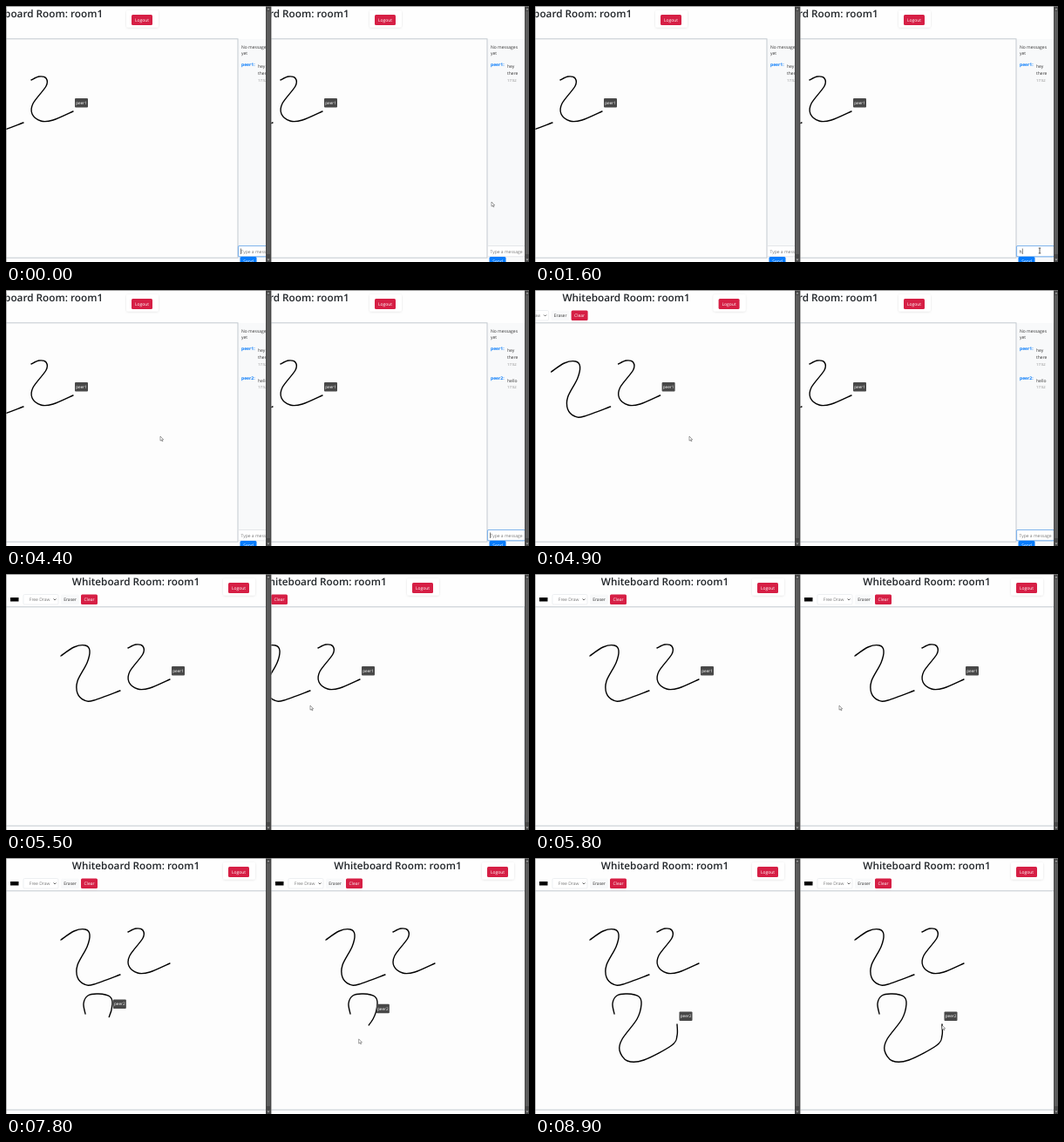
Write an HTML page that moves like this. It is 600 px wide and 294 px high and loops after 9 s.

```html
<!DOCTYPE html>
<html lang="en">
<head>
<meta charset="utf-8">
<title>Whiteboard</title>
<style>
  html, body { margin: 0; width: 100%; height: 100%; overflow: hidden; background: #fefefe; }
  svg { display: block; width: 600px; height: 294px; }
  text { font: 5px "Open Sans", "Noto Sans", sans-serif; fill: #333; text-rendering: geometricPrecision; }
  .title { font-size: 11.75px; font-weight: 600; fill: #212529; text-anchor: middle; }
  .mid { text-anchor: middle; }
  .light { fill: #fff; }
  .soft { fill: #777; }
  .name { font-weight: 700; fill: #087bfa; }
  .time { font-size: 4.2px; fill: #888; }
  .tag { font-size: 4.7px; fill: #fff; text-anchor: middle; }
  .ink { fill: none; stroke: #000; stroke-width: 1.4; stroke-linecap: round; stroke-linejoin: round; }
</style>
</head>
<body>
<svg id="stage" viewBox="0 0 600 294"></svg>
<script>
const LOOP = 9000, STEP = 100, RED = '#d61f45', BLUE = '#087bfa';
const stage = document.getElementById('stage');

// Catmull-Rom curve through a few points.
function curve(points) {
  const p = points.split(' ').map(s => s.split(',').map(Number));
  const at = i => p[Math.max(0, Math.min(p.length - 1, i))];
  const handle = (i, side) => at(i).map((v, k) => v + side * (at(i + 1)[k] - at(i - 1)[k]) / 6);
  return `M${p[0]}` + p.slice(1).map((q, i) => `C${handle(i, 1)} ${handle(i + 1, -1)} ${q}`).join('');
}

const strokes = [
  '63,94 78,84 91,82 96,88 93,102 82,123 82,137 90,145 101,145 131,134',
  '140,85 149,81 157,83 157,92 142,112 141,124 151,132 165,131 188,121',
  '91,179 89,167 94,158 106,156 119,159 122,168 117,185 100,208 97,221 106,233 125,232 157,215 163,204 163,191'
].map(curve);

const rect = (x, y, w, h, fill, more = '') =>
  `<rect x="${x}" y="${y}" width="${w}" height="${h}" fill="${fill}" ${more}/>`;
const text = (x, y, str, cls = '', id = '') => `<text x="${x}" y="${y}" class="${cls}" id="${id}">${str}</text>`;
const button = (x, y, w, h, label, fill, cls = 'light') =>
  rect(x, y, w, h, fill, 'rx="1.5"') + text(x + w / 2, y + h / 2 + 1.8, label, 'mid ' + cls);
const tag = (id, name) => `<g id="${id}">${rect(0, 0, 15, 10.5, '#484848', 'rx="1"')}${text(7.5, 6.8, name, 'tag')}</g>`;
const message = (y, name, lines) =>
  text(381, y, name + ':', 'name') +
  lines.map((line, i) => text(400, y + 2.5 + 7.8 * i, line)).join('') +
  text(400, y + 2.2 + 8.2 * lines.length, '17:52', 'time');

function pane(id, x, width) {
  return `<clipPath id="${id}clip">${rect(0, 0, width, 294, '#000')}</clipPath>
  <g transform="translate(${x})"><g clip-path="url(#${id}clip)">
    ${rect(0, 0, width, 294, '#fefefe')}
    <g id="${id}page">
      ${text(width / 2, 13, 'Whiteboard Room: room1', 'title')}
      ${rect(width - 49, 5, 37, 19.5, '#fff', 'rx="2" filter="url(#shade)"')}
      ${button(width - 43, 10, 24, 12, 'Logout', RED)}
      ${rect(5, 27, 9.5, 4.5, '#000')}
      ${rect(20, 23.5, 40, 11.5, '#fff', 'rx="1.5" stroke="#e3e6e9" stroke-width=".6"')}
      ${text(26.8, 31.1, 'Free Draw', 'soft')}
      <path d="M54.5 28.5l1.5 1.5 1.5-1.5" fill="none" stroke="#444" stroke-width=".8"/>
      ${button(63, 23.5, 21, 11.5, 'Eraser', '#f8f9fa', '')}
      ${button(86, 23.5, 19, 11.5, 'Clear', RED)}
      ${rect(377, 38, 44, 256, '#f8f9fa')}
      ${rect(-2, 37.8, 379, 251.4, '#fdfdfd', 'stroke="#c3c9cf"')}
      ${text(381, 48.5, 'No messages')}${text(381, 56.2, 'yet')}
      ${message(68.5, 'peer1', ['hey', 'there'])}
      <g id="${id}reply">${message(103, 'peer2', ['hello'])}</g>
      ${rect(377.5, 275.5, 43, 12.3, '#fff', `id="${id}field" rx="1"`)}
      ${text(380.5, 283.6, '', '', id + 'entry')}
      ${rect(380, 278.5, .6, 6.5, '#222', `id="${id}caret"`)}
      ${button(379.5, 288, 19, 10, 'Send', BLUE)}
      ${strokes.map((d, i) => `<path class="ink" id="${id}ink${i}" d="${d}"/>`).join('')}
      ${tag(id + 'tag1', 'peer1')}${tag(id + 'tag2', 'peer2')}
    </g></g>
    ${rect(0, 0, .6, 294, '#888')}
    ${rect(width, 0, 6, 294, '#474747')}
    ${rect(width + 1, 6, 4, 279, '#5c5c5c')}
    <path d="M${width + 1.5} 4.5l1.5-2 1.5 2zM${width + 1.5} 290.5l1.5 2 1.5-2z" fill="#aaa"/>
  </g>`;
}

stage.innerHTML = `<filter id="shade" x="-20%" y="-20%" width="140%" height="150%">
    <feDropShadow dx="0" dy=".6" stdDeviation=".8" flood-opacity=".13"/></filter>
  ${pane('L', 0, 298)}${pane('R', 304, 291)}
  ${rect(0, 0, 600, .7, '#777')}
  <path id="arrow" d="M0 0v5.2l1.3-1.1.8 1.8.8-.3-.8-1.8h1.6z" fill="#fff" stroke="#444" stroke-width=".5"/>
  <path id="beam" d="M-1.3-3h2.6M0-3v6M-1.3 3h2.6" fill="none" stroke="#222" stroke-width=".7"/>`;

const $ = id => document.getElementById(id);
const show = (id, on) => $(id).setAttribute('visibility', on ? 'visible' : 'hidden');
const move = (id, x, y) => $(id).setAttribute('transform', `translate(${x} ${y})`);
const ramp = (t, from, to) => Math.max(0, Math.min(1, (t - from) / (to - from)));

// The second user's stroke: a careful start, then a quick finish.
const guide = $('Link2'), total = guide.getTotalLength();
const drawn = t => total * (.48 * ramp(t, 6500, 7800) + .52 * ramp(t, 7800, 8420));
const tip = t => guide.getPointAtLength(drawn(t));

// Each move: start, end, x, y.
const moves = [[300, 1000, 579, 281], [3400, 4400, 177, 168], [5200, 5500, 349, 151], [6100, 6500, 395, 180]];

function pointer(t) {
  if (t > 6500) {
    const p = tip(t);
    return [p.x + 304, p.y + 1];
  }
  return moves.reduce(([x, y], [from, to, toX, toY]) => {
    const f = ramp(t, from, to);
    return [x + (toX - x) * f, y + (toY - y) * f];
  }, [557, 225]);
}

function drawPane(id, t, scroll, focus, entry, lag) {
  move(id + 'page', -scroll, 0);
  show(id + 'reply', t >= 3300);
  const field = $(id + 'field'), label = $(id + 'entry');
  field.setAttribute('stroke', focus ? '#80b4ec' : '#d5d9dd');
  field.setAttribute('stroke-width', focus ? 1.2 : .6);
  label.textContent = entry || 'Type a message';
  label.setAttribute('class', entry ? '' : 'soft');
  show(id + 'caret', focus && t % 1000 < 700);
  $(id + 'caret').setAttribute('x', 380 + (entry ? label.getComputedTextLength() + .8 : 0));

  const length = drawn(t - lag), active = length > 0;
  $(id + 'ink2').setAttribute('stroke-dasharray', `${length} 999`);
  show(id + 'ink2', active);
  show(id + 'tag1', !active);
  show(id + 'tag2', active);
  move(id + 'tag1', 190, 106);
  const p = tip(t - 260 - lag / 2);
  move(id + 'tag2', p.x + 2.5, p.y - 14.5);
}

function frame(now) {
  const t = Math.floor(now % LOOP / STEP) * STEP;
  const typed = t < 2900 ? 'hello'.slice(0, Math.max(0, Math.ceil((t - 1500) / 220))) : '';
  drawPane('L', t, 111 * (1 - ramp(t, 4600, 5100)), t < 1100, '', 380);
  drawPane('R', t, 129 * (1 - ramp(t, 5400, 5700)), t >= 1100, typed, 240);

  const [x, y] = pointer(t), overField = t < 4000 && x > 552 && y > 275;
  move('arrow', x, y);
  move('beam', x, y);
  show('arrow', !overField);
  show('beam', overField);
}

const start = performance.now();
function tick() {
  frame(performance.now() - start);
  requestAnimationFrame(tick);
}
tick();
</script>
</body>
</html>
```
